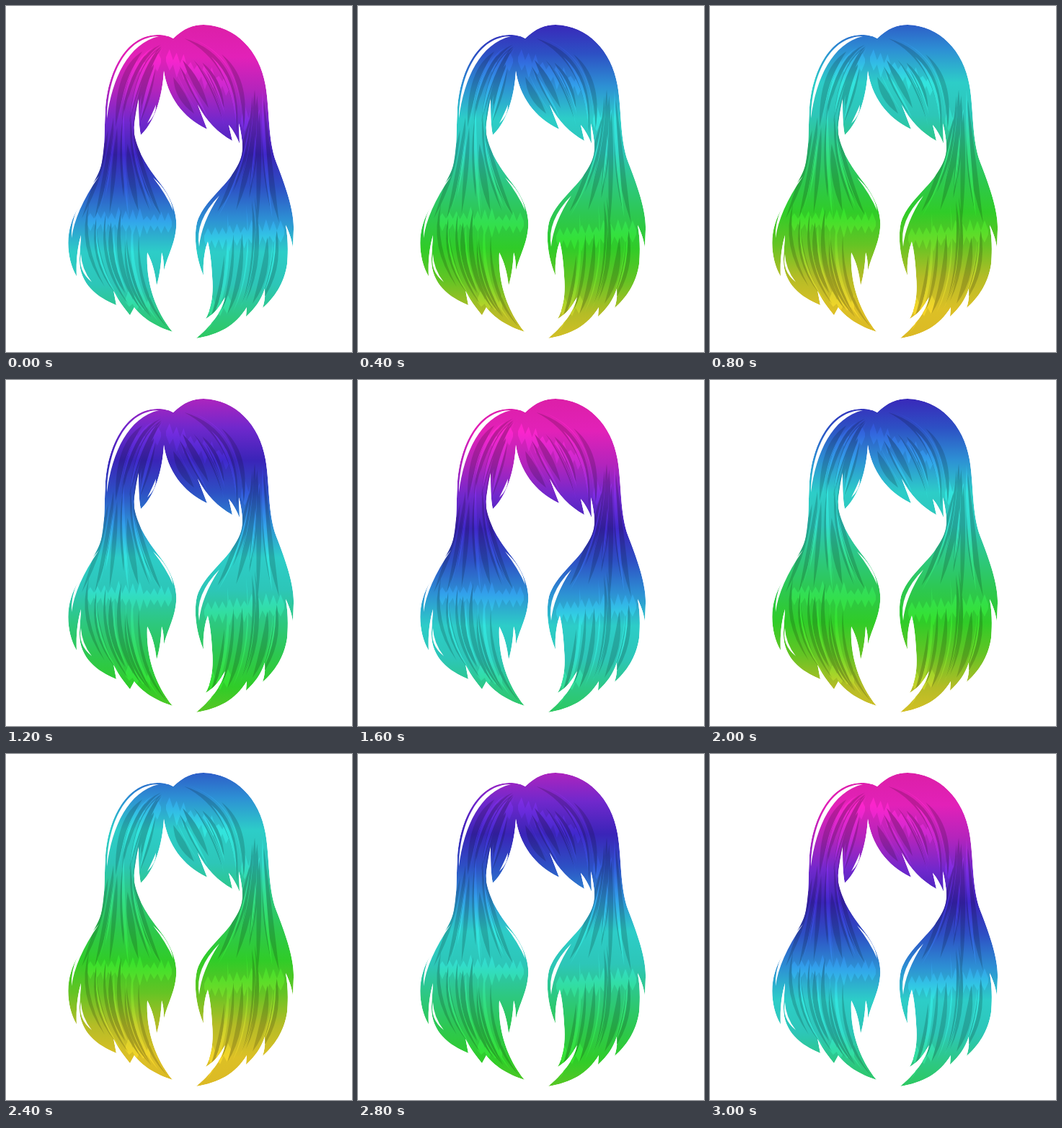
Animation, 480 px wide and 480 px high, one loop 3.2 s. Source, as an HTML page:

```html
<!DOCTYPE html>
<html lang="en">
<head>
<meta charset="utf-8">
<title>Rainbow hair</title>
<style>
  html, body { margin: 0; width: 100%; height: 100%; overflow: hidden; background: #fff; }
  svg { display: block; width: 100vw; height: 100vh; }
</style>
</head>
<body>
<svg id="stage" viewBox="0 0 480 480"></svg>
<script>
const NS = 'http://www.w3.org/2000/svg';
const stage = document.getElementById('stage');

// One rainbow of evenly spaced colours slides up through the hair and back
const RAINBOW = ('dc1fa8 e221b8 b424bc 7028cc 3a24b8 2d50c4 2d90d4 2dcdc8 ' +
  '2dc6b8 2dc880 2dc850 30cc28 64c424 b4bc26 dcc026 dcb824').split(' ');
const RAINBOW_TOP = 26, RAINBOW_HEIGHT = 675;
const SLIDES = [0, 95, 185, 235];
const STEP = 200;
const TONES = { base: 1, dark: 0.83, light: 1.11 };

const OUTLINE = `M232 45 C246 31 260 26 274 26 C318 27 352 62 360 110
  C366 145 363 185 375 217 C388 250 400 285 399 310 L398 335
  C396 322 392 312 388 304 C392 325 391 345 390 358 C386 385 372 405 356 419
  C359 410 360 400 359 392 C354 408 345 420 333 431 L334 418
  C318 444 295 456 264 461 C282 446 300 425 304 404 C296 417 288 428 277 434
  C286 418 288 395 286 375 C285 355 283 340 280 326 C275 340 273 358 274 374
  C264 350 260 322 265 300 C274 272 300 255 315 232 C324 218 329 208 328 192
  C327 180 325 170 323 163 L324 191 C320 181 315 172 309 165 L314 187
  C294 176 278 160 266 137 L279 171 C245 155 224 125 219 90
  C217 125 207 160 187 179 C184 165 184 145 184 128 C180 145 177 165 178 178
  C183 205 200 228 214 246 C230 266 238 290 236 308 C234 330 226 342 219 367
  C219 355 218 348 216 342 C215 360 213 374 209 388 C207 370 203 355 196 342
  C194 380 205 420 231 452 C208 445 188 432 178 418 L172 429
  C163 418 154 406 149 394 L153 415 C126 404 101 385 102 350 L104 318
  C99 335 97 355 98 375 C86 355 83 325 90 303 C100 270 128 245 133 217
  C138 190 136 170 138 145 C140 95 165 40 210 40 C220 40 227 42 232 45 Z`;

const PARTING_GAP = 'M140 156 C141 95 167 42 212 42 C170 52 147 100 140 156 Z';
const GAPS = [
  [[91, 322], [92, 283], [129, 236], 4], [[104, 344], [102, 366], [119, 383], 3],
  [[268, 334], [266, 300], [296, 263], 5], [[204, 238], [225, 260], [232, 284], 3],
  [[208, 137], [206, 150], [196, 163], 3]
];

// A lock lies between two guide curves: start, bend, end
const LOCKS = [
  [[[226, 48], [158, 50], [150, 175]], [[218, 55], [206, 100], [188, 174]]],
  [[[222, 62], [228, 125], [277, 168]], [[250, 40], [345, 62], [330, 185]]],
  [[[143, 130], [142, 210], [96, 300]], [[180, 140], [174, 215], [230, 300]]],
  [[[112, 265], [90, 335], [145, 406]], [[194, 265], [170, 385], [227, 448]]],
  [[[338, 115], [338, 215], [275, 295]], [[360, 115], [360, 210], [394, 312]]],
  [[[298, 270], [308, 400], [268, 459]], [[376, 260], [394, 345], [360, 408]]]
];

let seed = 7;
function random(min, max) {
  seed = (seed * 16807) % 2147483647;
  return min + (max - min) * seed / 2147483647;
}

const mix = (p, q, k) => p.map((v, i) => v + (q[i] - v) * k);
const along = ([a, b, c], t) => mix(mix(a, b, t), mix(b, c, t), t);

function leaf([p, c, q, w]) {
  const len = Math.hypot(q[0] - p[0], q[1] - p[1]);
  const nx = (p[1] - q[1]) / len * w, ny = (q[0] - p[0]) / len * w;
  return `M${p}Q${c[0] + nx} ${c[1] + ny} ${q}Q${c[0] - nx} ${c[1] - ny} ${p}Z`;
}

// Tapered strands that follow random stretches of a lock
function strands(count, thin, thick) {
  return LOCKS.flatMap(([left, right]) => Array.from({ length: count }, (_, i) => {
    const k = (i + random(0.2, 0.8)) / count;
    const curve = left.map((p, j) => mix(p, right[j], k));
    const from = random(0, 0.35), to = random(0.75, 1);
    const p = along(curve, from), q = along(curve, to);
    const bend = mix(mix(p, q, 0.5), along(curve, (from + to) / 2), 2);
    return leaf([p, bend, q, random(thin, thick)]);
  }));
}

// A jagged band of shine between two points
function shine([x0, y0], [x1, y1], height) {
  const count = Math.round((x1 - x0) / 5);
  const edge = side => Array.from({ length: count + 1 }, (_, i) => {
    const reach = i % 2 ? random(0.4, 1) : 0.15;
    return [x0 + (x1 - x0) * i / count, y0 + (y1 - y0) * i / count + side * height * reach];
  });
  return 'M' + [...edge(-1), ...edge(1).reverse()].join('L') + 'Z';
}

function add(parent, tag, attrs) {
  const node = document.createElementNS(NS, tag);
  for (const key in attrs) node.setAttribute(key, attrs[key]);
  return parent.appendChild(node);
}

function shade(hex, factor) {
  return `rgb(${hex.match(/../g).map(c => Math.min(255, Math.round(parseInt(c, 16) * factor)))})`;
}

const defs = add(stage, 'defs', {});
const gradients = Object.entries(TONES).map(([id, factor]) => {
  const gradient = add(defs, 'linearGradient', { id, gradientUnits: 'userSpaceOnUse', x1: 0, x2: 0 });
  RAINBOW.forEach((hex, i) => add(gradient, 'stop', {
    offset: i / (RAINBOW.length - 1), 'stop-color': shade(hex, factor)
  }));
  return gradient;
});
add(add(defs, 'clipPath', { id: 'shape' }), 'path', { d: OUTLINE });

const fill = (parent, paths, paint) => add(parent, 'path', { d: paths.join(''), fill: paint });
const hair = add(stage, 'g', { 'clip-path': 'url(#shape)' });
fill(hair, [OUTLINE], 'url(#base)');
fill(hair, [
  shine([165, 95], [215, 76], 18), shine([222, 74], [310, 112], 20),
  shine([326, 160], [352, 158], 24), shine([112, 298], [230, 302], 22),
  shine([275, 322], [386, 314], 22), shine([166, 408], [200, 416], 18),
  shine([282, 424], [312, 412], 18)
], 'url(#light)');
fill(hair, strands(7, 4, 10), 'url(#dark)');
fill(hair, strands(3, 2, 5), 'url(#light)');
fill(hair, strands(3, 0.6, 1.2), 'url(#light)');
fill(stage, [PARTING_GAP, ...GAPS.map(leaf)], '#fff');

function paint(slide) {
  for (const gradient of gradients) {
    gradient.setAttribute('y1', RAINBOW_TOP - slide);
    gradient.setAttribute('y2', RAINBOW_TOP + RAINBOW_HEIGHT - slide);
  }
}

const start = performance.now();
const last = SLIDES.length * 2 - 1;
function tick() {
  const step = Math.floor((performance.now() - start) / STEP) % (last + 1);
  paint(SLIDES[Math.min(step, last - step)]);
  requestAnimationFrame(tick);
}
tick();
</script>
</body>
</html>
```
